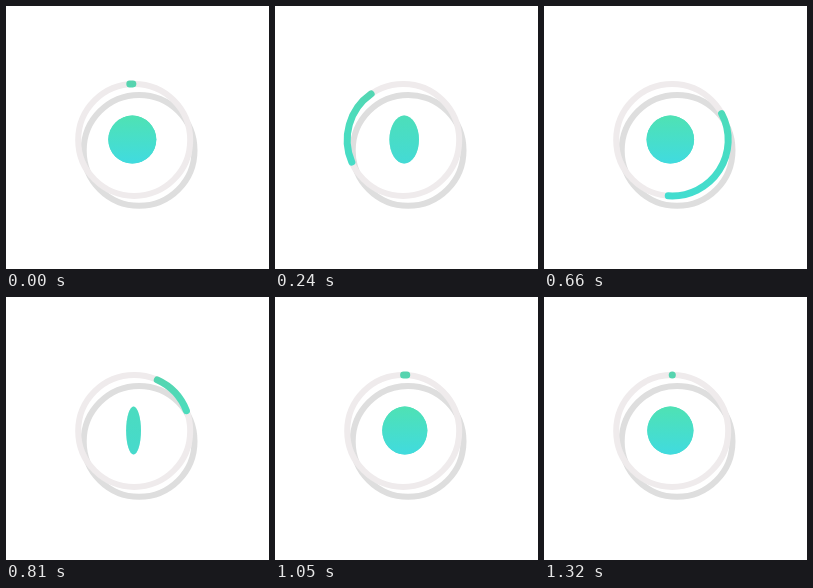
An HTML page for the animation above (1350 ms loop, 263 by 263 pixels).

```html
<!DOCTYPE html>
<html lang="en">
<head>
<meta charset="utf-8">
<title>Coin loader</title>
<style>
  html, body { margin: 0; width: 100%; height: 100%; overflow: hidden; background: #fff; }
  svg { display: block; width: 100vw; height: 100vh; }
  .ring { fill: none; stroke-width: 6; }
  #arc { fill: none; stroke: url(#arcFill); stroke-width: 7; stroke-linecap: round; }
</style>
</head>
<body>
<svg viewBox="0 0 263 263">
  <defs>
    <linearGradient id="arcFill" gradientUnits="userSpaceOnUse" x1="0" y1="75" x2="0" y2="193">
      <stop offset="0" stop-color="#57d3ae"/>
      <stop offset=".3" stop-color="#4cdcbb"/>
      <stop offset="1" stop-color="#42ddd0"/>
    </linearGradient>
    <linearGradient id="coinFill" x1="0" y1="0" x2="0" y2="1">
      <stop offset="0" stop-color="#4fe2b3"/>
      <stop offset="1" stop-color="#40dbe0"/>
    </linearGradient>
  </defs>
  <circle class="ring" cx="133.1" cy="144.4" r="55.4" stroke="#dedede"/>
  <circle class="ring" cx="128.2" cy="133.9" r="56" stroke="#efebec"/>
  <path id="arc"/>
  <g id="coin">
    <circle r="24" fill="#49d9c4"/>
    <circle id="shine" r="24" fill="url(#coinFill)"/>
  </g>
</svg>
<script>
  const LOOP = 1350, STEP = 30;
  const CX = 128.2, CY = 133.9, R = 56;
  const [arc, coin, shine] = ['arc', 'coin', 'shine'].map(id => document.getElementById(id));

  // Leading end: degrees counter-clockwise from the top, brisk start and long ease-out
  function headAt(t) {
    const u = Math.min(t / 1100, 1);
    return 360 - 355.5 * (1 - u ** 1.28) ** 2.38;
  }

  // Trailing end: stays at a fixed share of the lead, then catches up
  function tailAt(t) {
    const catchUp = 1 / (1 + Math.exp((690 - t) / 83));
    return headAt(t) * (0.305 + 0.695 * catchUp);
  }

  function point(deg) {
    const a = deg * Math.PI / 180;
    return `${(CX - R * Math.sin(a)).toFixed(3)} ${(CY - R * Math.cos(a)).toFixed(3)}`;
  }

  function draw(t) {
    const from = tailAt(t), to = headAt(t);
    arc.setAttribute('d', `M${point(from)}A${R} ${R} 0 0 0 ${point(to)}`);

    // Two turns per loop around an axis slightly off the coin's centre
    const c = Math.cos(4 * Math.PI * t / LOOP), width = Math.abs(c);
    coin.setAttribute('transform', `translate(${128.1 - 1.8 * c} 133.6) scale(${width} 1)`);
    shine.setAttribute('opacity', width);
  }

  const start = performance.now();
  function tick() {
    const t = (performance.now() - start) % LOOP;
    draw(Math.floor(t / STEP) * STEP);
    requestAnimationFrame(tick);
  }
  tick();
</script>
</body>
</html>
```
